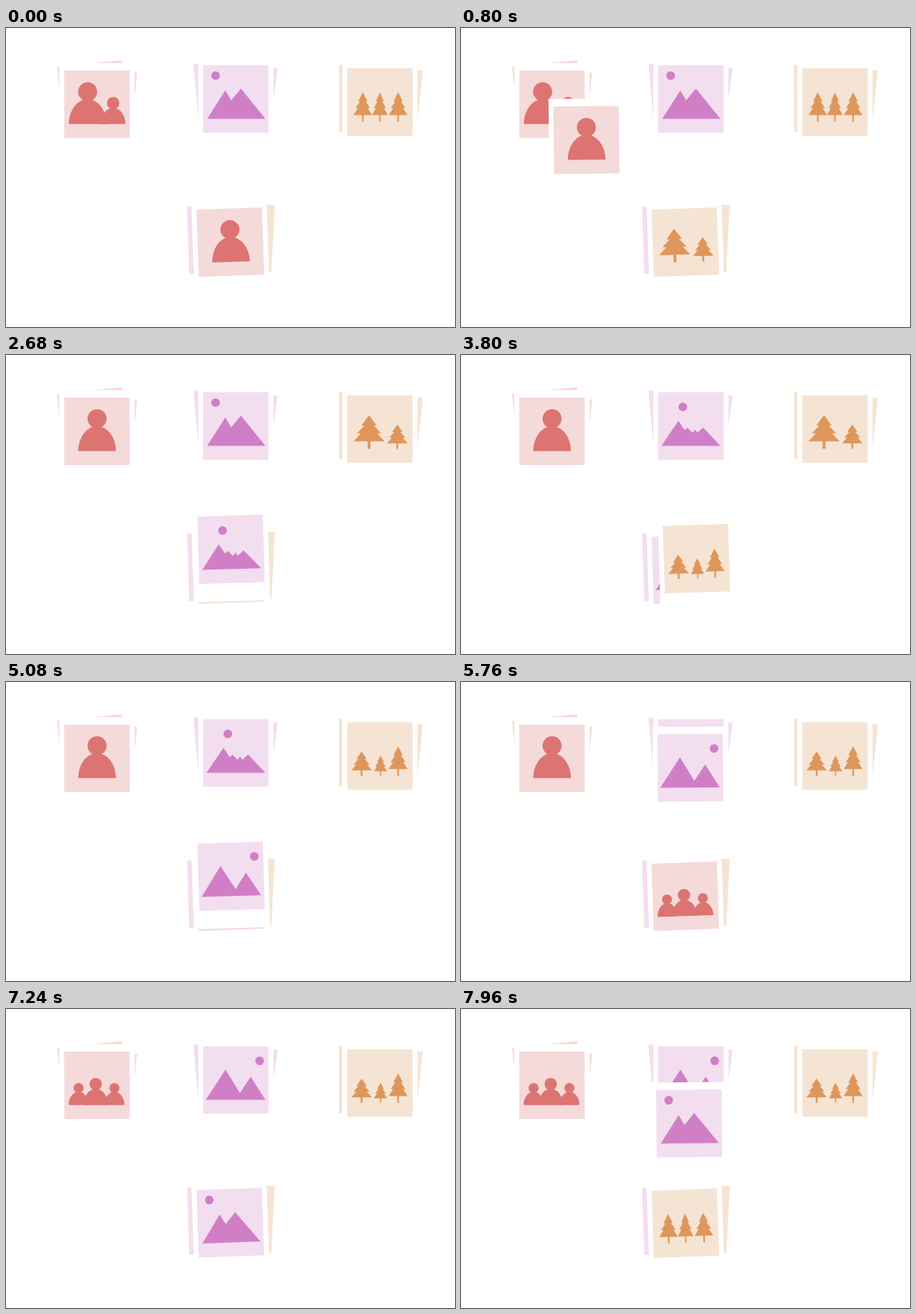
An HTML page with a canvas for the animation above (8000 ms loop, 600 by 400 pixels).

```html
<!DOCTYPE html>
<html lang="en">
<head>
<meta charset="utf-8">
<title>Sorting photos</title>
<style>
  html, body { margin: 0; width: 100%; height: 100%; overflow: hidden; background: #fff; }
  canvas { display: block; }
</style>
</head>
<body>
<canvas id="stage" width="600" height="400"></canvas>
<script>
const ctx = document.getElementById('stage').getContext('2d');
const LOOP = 8000, FLIGHT = 1200;
const W = 87.4, H = 90.2;                              // picture area of a card
const FRAME = { side: 6.4, top: 10, bottom: 24.3 };    // white border
const GROUND = 71.6;

const KINDS = {
  people:    { back: '#f5dada', ink: '#dc7472', x: 121.6, y: 102.1 },
  mountains: { back: '#f2deef', ink: '#d07fc6', x: 307.1, y: 95 },
  trees:     { back: '#f5e4d4', ink: '#df965a', x: 499.7, y: 99 }
};
const SOURCE_PILE = { x: 299.75, y: 286.5, angle: -2 };

function disc(x, y, r) {
  ctx.beginPath();
  ctx.arc(x, y, r, 0, 2 * Math.PI);
  ctx.fill();
}

function polygon(points) {
  ctx.beginPath();
  points.forEach(([x, y]) => ctx.lineTo(x, y));
  ctx.fill();
}

function person(x, size) {
  disc(x, GROUND - 43.3 * size, 12.7 * size);
  ctx.beginPath();
  ctx.ellipse(x, GROUND, 25.2 * size, 33.5 * size, 0, Math.PI, 2 * Math.PI);
  ctx.fill();
}

function tree(x, w, h) {
  // half widths and heights of the right-hand outline, from the tip down
  const side = [[0, 0], [.25, .31], [.15, .31], [.39, .54], [.26, .54], [.5, .775],
                [.045, .775], [.045, 1]];
  const place = sign => ([dx, dy]) => [x + sign * dx * w, GROUND + (dy - 1) * h];
  polygon([...side.map(place(1)), ...side.map(place(-1)).reverse()]);
}

const people = (...list) => ({ kind: 'people', draw: () => list.forEach(p => person(...p)) });
const trees = (...list) => ({ kind: 'trees', draw: () => list.forEach(t => tree(...t)) });
const mountains = (sunX, sunY, ...ridge) => ({
  kind: 'mountains',
  draw() {
    disc(sunX, sunY, 5.8);
    polygon([...ridge, [83.2, GROUND]]);
  }
});

const twinPeaks = mountains(16.7, 13.8, [5.5, GROUND], [29.7, 33.7], [37.5, 46.8], [50.6, 31.2]);
const grove = trees([20.8, 25, 39.5], [43.6, 21, 39.5], [68, 25, 39.5]);

const sorted = [people([31.2, 1], [65.3, .65]), twinPeaks, grove];
const queue = [
  people([43.8, 1]),
  trees([29.1, 41.5, 45], [66.9, 27.5, 32.5]),
  mountains(33, 19.6, [4.5, GROUND], [27.2, 38], [35.5, 50.5], [39.2, 47.3], [46, 54],
            [49.5, 49.7], [52.3, 54], [60.3, 47]),
  trees([19.2, 27.5, 32.5], [44.5, 18, 27], [68, 25.5, 39.5]),
  mountains(75.6, 19.4, [3.5, GROUND], [30, 31], [49.2, 62.5], [63.6, 40.7]),
  people([19.1, .53], [42, .65], [67, .53]),
  twinPeaks,
  grove
];

// Blank cards that peek out from under each pile: kind, centre, angle
const peeking = [
  ['people', 127.1, 100.4, 5.9], ['people', 116.3, 92.4, -5.9],
  ['mountains', 313.5, 93.1, 8], ['mountains', 298, 89.1, -5],
  ['trees', 508.8, 97.3, 6], ['trees', 488.6, 94.3, 0],
  ['trees', 313.2, 279.5, 3], ['mountains', 287.1, 282.6, -1.8]
];

function drawCard({ kind, draw }, { x, y, angle = 0 }) {
  ctx.save();
  ctx.translate(x, y);
  ctx.rotate(angle * Math.PI / 180);
  ctx.translate(-W / 2, -H / 2);
  ctx.fillStyle = '#fff';
  ctx.fillRect(-FRAME.side, -FRAME.top, W + 2 * FRAME.side, H + FRAME.top + FRAME.bottom);
  ctx.fillStyle = KINDS[kind].back;
  ctx.fillRect(0, 0, W, H);
  ctx.fillStyle = KINDS[kind].ink;
  if (draw) draw();
  ctx.restore();
}

function flightPose(card, progress) {
  const ease = progress * progress * (3 - 2 * progress);
  const mix = (a, b) => a + (b - a) * ease;
  const goal = KINDS[card.kind];
  return {
    x: mix(SOURCE_PILE.x, goal.x),
    y: mix(SOURCE_PILE.y, goal.y),
    angle: mix(SOURCE_PILE.angle, 0)
  };
}

function render(time) {
  const current = Math.floor(time / FLIGHT);
  const flying = queue[current];
  ctx.fillStyle = '#fff';
  ctx.fillRect(0, 0, 600, 400);
  peeking.forEach(([kind, x, y, angle]) => drawCard({ kind }, { x, y, angle }));
  [...sorted, ...queue.slice(0, current)].forEach(card => drawCard(card, KINDS[card.kind]));
  drawCard(queue[current + 1], SOURCE_PILE);
  drawCard(flying, flightPose(flying, time % FLIGHT / FLIGHT));
}

const start = performance.now();
function tick() {
  render((performance.now() - start) % LOOP);
  requestAnimationFrame(tick);
}
tick();
</script>
</body>
</html>
```
